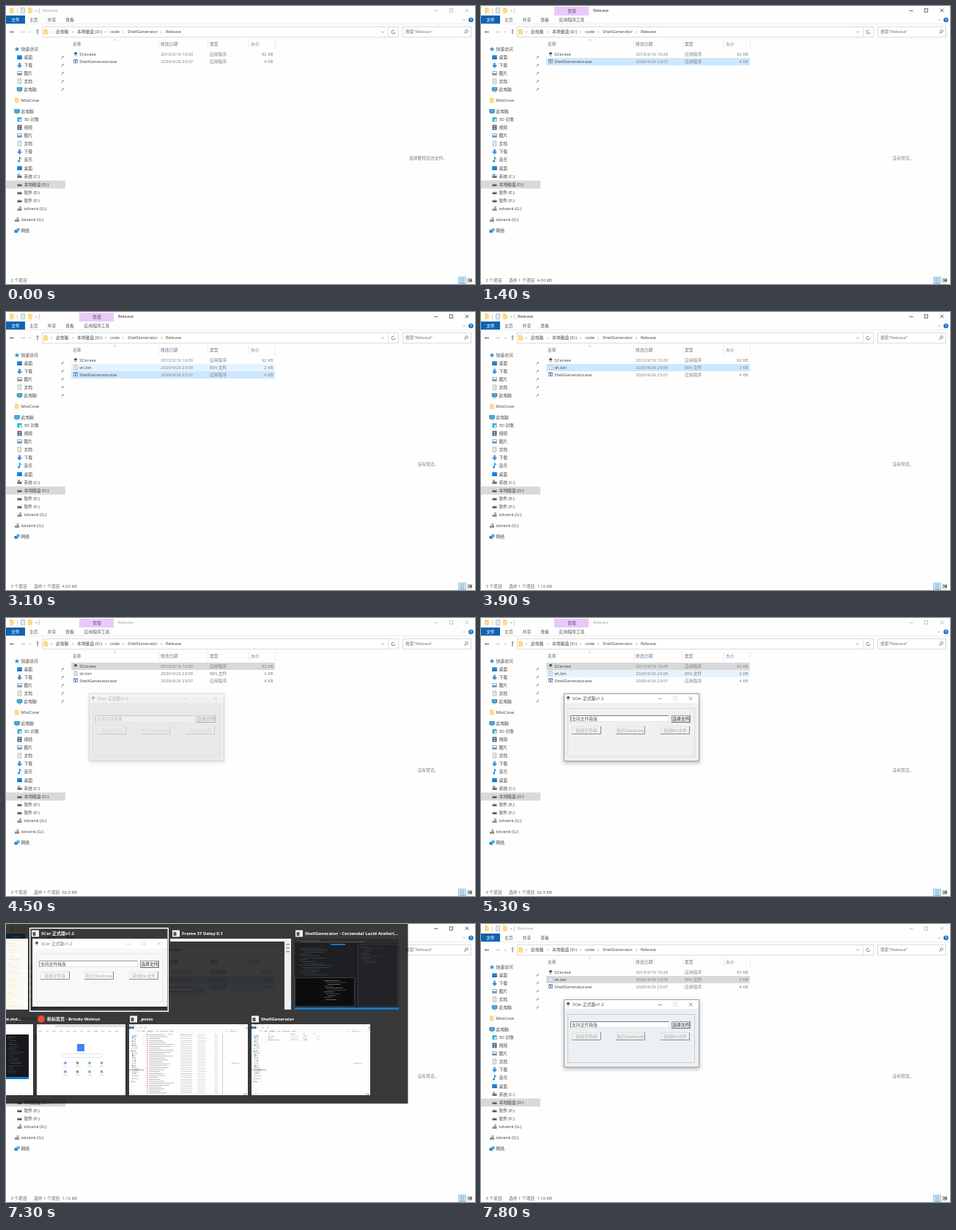
Write an HTML page with a canvas that moves like this. It is 640 px wide and 380 px high and loops after 8 s.

```html
<!DOCTYPE html>
<html lang="zh-CN">
<head>
<meta charset="utf-8">
<title>Release</title>
<style>
html, body { margin: 0; width: 100%; height: 100%; overflow: hidden; background: #fff }
canvas { display: block }
</style>
</head>
<body>
<canvas id="stage" width="640" height="380"></canvas>
<script>
const c = document.getElementById('stage').getContext('2d');
const LOOP = 8000;
const UI = '"Noto Sans", "Noto Sans CJK SC", "Noto Sans CJK", sans-serif';
const CLASSIC = '"Liberation Sans", "Noto Sans CJK SC", "Noto Sans CJK", sans-serif';

// value of the last [time, value] step that has begun
const step = (t, ...list) => list.filter(([at]) => at <= t).pop()[1];
const rnd = n => { const v = Math.sin(n * 12.9898) * 43758.5453; return v - Math.floor(v); };

function box(x, y, w, h, fill, edge) {
  if (fill) { c.fillStyle = fill; c.fillRect(x, y, w, h); }
  if (edge) { c.strokeStyle = edge; c.lineWidth = 1; c.strokeRect(x + .5, y + .5, w - 1, h - 1); }
}
function line(color, width, ...p) {
  c.strokeStyle = color;
  c.lineWidth = width;
  c.beginPath();
  for (let i = 0; i < p.length; i += 2) c.lineTo(p[i], p[i + 1]);
  c.stroke();
}
function dot(x, y, r, fill) {
  c.fillStyle = fill;
  c.beginPath();
  c.arc(x, y, r, 0, 7);
  c.fill();
}
// y is the middle of the line
function text(s, x, y, color = '#484848', align = 'left', font = '5.8px ' + UI) {
  c.font = font;
  c.fillStyle = color;
  c.textAlign = align;
  c.fillText(s, x, y + 2.1);
}
function chevron(x, y, dx, dy, color = '#777') {
  line(color, .8, x - dx - dy * 2, y - dy - dx * 2, x + dx, y + dy, x - dx + dy * 2, y - dy + dx * 2);
}
function caption(xs, y, color, midColor = color) {
  const [a, b, d] = xs;
  line(color, .8, a - 2.5, y + .5, a + 2.5, y + .5);
  c.strokeStyle = midColor;
  c.strokeRect(b - 2.2, y - 2.2, 4.4, 4.4);
  line(color, .8, d - 2.3, y - 2.3, d + 2.3, y + 2.3);
  line(color, .8, d + 2.3, y - 2.3, d - 2.3, y + 2.3);
}

const icons = {
  folder() { box(-3, -3.5, 4, 7, '#f2bf4b'); box(-3, -2.5, 6, 6, '#ffdc82'); },
  star() {
    c.fillStyle = '#2f8fd8';
    c.beginPath();
    for (let i = 0; i < 10; i++) {
      const r = i % 2 ? 1.6 : 3.8, a = i * Math.PI / 5;
      c.lineTo(r * Math.sin(a), -r * Math.cos(a));
    }
    c.fill();
  },
  desk() { box(-3.5, -2.8, 7, 5.6, '#1b86dc'); box(-3.5, 1.5, 7, 1.3, '#0d5ea8'); },
  down() { line('#2683d6', 2.4, 0, -3.5, 0, 1); line('#2683d6', 1.6, -2.8, 0, 0, 2.8, 2.8, 0); },
  pic() { box(-3.5, -3, 7, 6, '#f4f8fb', '#9aa5ad'); box(-2.5, 0, 5, 2, '#3f8fc9'); },
  doc() {
    box(-2.8, -3.8, 5.6, 7.6, '#fff', '#b3b3b3');
    box(-1.3, -1.6, 2.8, .7, '#9bb7cf'); box(-1.3, .6, 2.8, .7, '#9bb7cf');
  },
  pc() { box(-3.8, -3, 7.6, 5, '#49b2ee', '#3a83b5'); box(-2.5, 2.6, 5, 1, '#5b8db0'); },
  cube() { box(-3.2, -3, 6.4, 6.2, '#1fb3d6'); box(-.5, -.5, 3, 3, '#d5f4fa'); },
  film() { box(-3, -3.6, 6, 7.2, '#4b4b52'); box(-1.6, -2.5, 3.2, 2, '#b9c7d6'); box(-1.6, .7, 3.2, 2, '#b9c7d6'); },
  note() { line('#1c8be0', 1.2, 0, 2, 0, -3.5, 2.3, -1); dot(-1, 2.2, 1.6, '#1c8be0'); },
  disk() { box(-3.2, -1.4, 6.4, 1.6, '#b5b8ba'); box(-3.2, 0, 6.4, 2.4, '#53585c'); },
  sys() { icons.disk(); box(-2.5, -3.2, 3, 2, '#39a5e3'); },
  usb() { box(-3.2, 0, 6.4, 3, '#8b8f92'); box(-.5, -3.4, 3, 3.4, '#a9adb0'); },
  net() { box(-3.8, -1, 5, 4, '#2c86c8'); box(-.5, -3.2, 4.3, 4, '#49aee8'); },
  person() { dot(0, -1.3, 2, '#34404b'); box(-2, .6, 4, 2.5, '#c9d3d6'); box(-2.6, -1.2, 5.2, .9, '#4c7d76'); },
  app() { box(-3.2, -3, 6.4, 6, '#fff', '#7d93ad'); box(-3.2, -3, 6.4, 1.6, '#3e7ec4'); box(-1, -.3, 2, 2, '#2a5fa3'); }
};
function icon(kind, x, y, k = 1) {
  c.save();
  c.translate(x, y);
  c.scale(k, k);
  icons[kind]();
  c.restore();
}

const FILES = {
  scer: { name: 'SCer.exe', date: '2013/2/16 10:29', type: '应用程序', size: '92 KB', full: '92.0 KB', icon: 'person' },
  bin: { name: 'sh.bin', date: '2020/4/26 23:09', type: 'BIN 文件', size: '2 KB', full: '1.10 KB', icon: 'doc' },
  gen: { name: 'ShellGenerator.exe', date: '2020/4/26 23:07', type: '应用程序', size: '4 KB', full: '4.00 KB', icon: 'app' }
};
// y, icon, label; "-" marks a top-level entry
const TREE = [
  [59, 'star', '-快速访问'], [70, 'desk', '桌面'], [81, 'down', '下载'], [92, 'pic', '图片'], [103, 'doc', '文档'],
  [114, 'pc', '此电脑'], [129, 'folder', '-MistCove'], [144, 'pc', '-此电脑'], [155, 'cube', '3D 对象'],
  [166, 'film', '视频'], [177, 'pic', '图片'], [188, 'doc', '文档'], [199, 'down', '下载'], [210, 'note', '音乐'],
  [221.5, 'desk', '桌面'], [232.5, 'sys', '系统 (C:)'], [244, 'disk', '本地磁盘 (D:)'], [255, 'disk', '软件 (E:)'],
  [266, 'disk', '软件 (F:)'], [277, 'usb', 'tolvenk (G:)'], [292, 'usb', '-tolvenk (G:)'], [307, 'net', '-网络']
];

function titleBar(s) {
  const tool = s.sel && s.sel !== 'bin';
  icon('folder', 8, 6);
  icon('doc', 23, 6);
  icon('folder', 33, 6);
  line('#aaa', .6, 15.5, 3, 15.5, 10);
  line('#aaa', .6, 45.5, 3, 45.5, 10);
  chevron(41.5, 6.5, 0, .6);
  if (tool) {
    box(100, 1, 47, 12, '#e9c9fb');
    text('管理', 124, 7, '#6a5478', 'center');
    text('应用程序工具', 124, 19, '#555', 'center');
  }
  text('Release', tool ? 153 : 50, 6.3, s.active ? '#333' : '#a5a5a5');
  caption([587, 607.5, 629], 6, s.active ? '#444' : '#b5b5b5');
  box(0, 13, 26, 11, '#0f63b3');
  text('文件', 13, 19, '#fff', 'center');
  ['主页', '共享', '查看'].forEach((label, i) => text(label, 32 + 24.6 * i, 19, '#555'));
  chevron(625, 19, 0, .7, '#999');
  dot(634.5, 19, 3.3, '#1673c7');
  text('?', 634.5, 19, '#fff', 'center', 'bold 5px ' + UI);
  box(0, 24, 640, 1, '#ececec');
}

function addressBar() {
  line('#555', .9, 5.5, 35.5, 11, 35.5); chevron(6, 35.5, -.6, 0, '#555');
  line('#c4c4c4', .9, 20, 35.5, 25.5, 35.5); chevron(25, 35.5, .6, 0, '#c4c4c4');
  chevron(33, 35.5, 0, .6, '#999');
  line('#555', .9, 43, 38.5, 43, 32.5); chevron(43, 33, 0, -.6, '#555');
  box(49, 28, 487, 15, '#fff', '#dcdcdc');
  box(541, 28, 94, 15, '#fff', '#dcdcdc');
  icon('folder', 54.5, 35.5);
  [62, 91, 136, 160, 212].forEach(x => chevron(x, 35.5, .5, 0));
  [[68, '此电脑'], [97, '本地磁盘 (D:)'], [142, 'code'], [166, 'ShellGenerator'], [218, 'Release']]
    .forEach(([x, label]) => text(label, x, 35.3));
  chevron(514, 35.5, 0, .8);
  box(521, 29, 1, 13, '#e2e2e2');
  c.strokeStyle = '#666';
  c.lineWidth = .8;
  c.beginPath(); c.arc(528.5, 35.5, 2.3, 0, 5.2); c.stroke();
  text('搜索"Release"', 545, 35.3, '#777');
  c.beginPath(); c.arc(628.5, 34.5, 1.8, 0, 7); c.stroke();
  line('#666', .8, 627, 36, 625.3, 38);
}

function tree() {
  box(0, 238.5, 81, 11, '#d9d9d9');
  TREE.forEach(([y, kind, label], i) => {
    const top = label[0] === '-';
    icon(kind, top ? 15 : 18.5, y, .95);
    text(label.replace('-', ''), top ? 20.5 : 24.5, y);
    if (i > 0 && i < 6) {
      line('#888', 1.3, 76.5, y + .5, 78.7, y - 1.6);
      line('#888', .7, 75, y + 2, 77, y);
    }
  });
}

function fileList(s) {
  chevron(148.5, 46.5, 0, -.6, '#999');
  [[91, '名称'], [211, '修改日期'], [278, '类型'], [334, '大小']].forEach(([x, label]) => text(label, x, 52, '#66748a'));
  [208, 275, 331, 367].forEach(x => box(x, 46, 1, 13, '#ebebeb'));
  s.files.forEach((id, i) => {
    const f = FILES[id], y = 66 + 9.7 * i;
    const back = id === s.sel ? (s.active ? '#cce8ff' : '#d9d9d9') : id === s.hover ? '#e5f3ff' : null;
    if (back) box(89, 61 + 10 * i, 278, 10, back);
    icon(f.icon, 95, y, .9);
    text(f.name, 100.3, y);
    text(f.date, 211.3, y, '#808080');
    text(f.type, 278, y, '#808080');
    text(f.size, 364.5, y, '#808080', 'right');
  });
}

function explorer(s) {
  box(0, 0, 640, 380, '#fefefe');
  titleBar(s);
  addressBar();
  tree();
  fileList(s);
  text(s.sel ? '没有预览。' : '选择要预览的文件。', 576, 208, '#808080', 'center');
  text(s.files.length + ' 个项目', 6.5, 375.3, '#606060');
  if (s.sel) {
    text('选中 1 个项目', 38, 375.3, '#606060');
    text(FILES[s.sel].full, 76.5, 375.3, '#606060');
  }
  box(617, 370, 11, 10, '#cfe9f8', '#8ecdf0');
  for (let y = 372; y < 379; y += 2) box(619.5, y, 6, .8, '#8fa6b4');
  box(630, 372.5, 6, 5, '#fff', '#777');
  box(632, 374, 3, 2, '#666');
}

const LOOKS = {
  plain: { back: '#f0f0f0', edge: '#a0a0a0', group: '#c4c4c4', ink: '#444', mark: '#888', field: '#777' },
  dragged: { back: '#ecf0f2', edge: '#a0a0a0', group: '#a5b2b8', ink: '#444', mark: '#777', field: '#777' },
  preview: { back: '#f8f8f8', edge: '#ececec', group: '#d4d4d4', ink: '#777', mark: '#c4c4c4', field: '#999' }
};
function dialogButton(label, x, y, w, h, look, on) {
  box(x, y, w, h, look.back, on ? '#999' : '#e4e4e4');
  line(on ? '#666' : '#8c8c8c', 1, x, y + h - .5, x + w - .5, y + h - .5, x + w - .5, y);
  text(label, x + w / 2, y + h / 2, on ? '#333' : '#adadad', 'center', '5.8px ' + CLASSIC);
}
function dialog(alpha, look) {
  c.save();
  c.globalAlpha = alpha;
  c.shadowColor = 'rgba(0,0,0,.3)';
  c.shadowBlur = 6;
  c.shadowOffsetY = 1.5;
  box(113, 103, 185, 93, look.back);
  c.shadowColor = 'transparent';
  box(114, 104, 183, 12, '#fff');
  box(113, 103, 185, 93, null, look.edge);
  icon('person', 119, 110, .9);
  text('SCer 正式版v1.2', 125, 109.7, look.ink);
  caption([244, 265, 286], 110, look.mark, '#d4d4d4');
  c.setLineDash([1, 1]);
  box(118, 123, 174, 67, null, look.group);
  c.setLineDash([]);
  box(122, 133, 135, 9, '#fff', '#e4e4e4');
  line(look.field, 1, 122.5, 142, 122.5, 133.5, 256, 133.5);
  text('支持文件拖曳', 124, 138, '#555', 'left', '5.8px ' + CLASSIC);
  dialogButton('选择文件', 260, 133, 25.5, 10, look, true);
  dialogButton('转成字符串', 124, 148, 40, 11, look);
  dialogButton('执行Shellcode', 184, 148, 40, 11, look);
  dialogButton('转成Bin文件', 245, 148, 40, 11, look);
  c.restore();
}

// pale trace left behind when the dialog goes to the back
function trace() {
  c.strokeStyle = '#f7f7f7';
  c.lineWidth = 4;
  c.beginPath(); c.roundRect(105, 95, 199, 108, 6); c.stroke();
  box(114, 104, 183, 11, '#fafafa');
  box(124, 134, 132, 8, '#f7f7f7');
}

function dragTip() {
  box(183, 87, 88, 10, '#fff', '#bbb');
  text('用 ShellGenerator.exe 打开', 268.5, 92, '#3b4a8c', 'right');
}

// rows of tiny unreadable writing
function scribble(x, y, w, rows, gap, colors, seed) {
  for (let i = 0; i < rows; i++) {
    const r = rnd(seed + i);
    box(x + (i % 3) * w * .06, y + i * gap, w * (.2 + .6 * r), .6, colors[i % colors.length]);
  }
}
function clipped(x, y, w, h, paint) {
  c.save();
  c.beginPath(); c.rect(x, y, w, h); c.clip();
  paint();
  c.restore();
}
function miniExplorer(x, files) {
  clipped(x, 137, 162, 97, () => {
    c.translate(x, 137);
    c.scale(162 / 640, 97 / 380);
    explorer({ files, active: false });
  });
}
function heading(label, x, y, kind) {
  if (kind === 'round') dot(x - 8, y, 5, '#ea4a3a');
  else if (kind) { box(x - 13, y - 4.5, 10, 9, '#f2f3f3'); box(x - 11.5, y - 2, 4, 5, '#45615f'); }
  text(label, x, y, '#fff', 'left', 'bold 6px ' + UI);
}

function codeThumb() {
  box(394, 20, 142, 97, '#1e1f22');
  box(394, 20, 142, 6, '#2d2d31');
  scribble(396, 22, 110, 2, 2, ['#66666c'], 12);
  box(443, 27, 20, 2, '#0d78cc');
  scribble(400, 33, 60, 15, 2.6, ['#3f5a3d', '#4c4f55', '#344f68'], 21);
  box(394, 73, 82, 40, '#0d0d0f', '#3c3c40');
  scribble(434, 77, 38, 11, 2.6, ['#999', '#666'], 40);
  box(480, 27, 55, 86, '#222327', '#38383d');
  scribble(484, 31, 40, 9, 2.6, ['#50545a', '#3c3f45'], 61);
  box(394, 114, 142, 3, '#0d78cc');
}

function notesThumb() {
  box(0, 137, 37, 97, '#fdfdfd');
  box(0, 151, 31, 61, '#17181c');
  scribble(2, 154, 25, 20, 2.6, ['#555', '#3c4a60'], 81);
  box(0, 209, 31, 3, '#0d78cc');
}

function browserThumb() {
  box(42, 137, 121, 97, '#fff');
  box(42, 137, 121, 4, '#dee1e6');
  box(45, 138, 22, 3, '#fff');
  for (let i = 0; i < 12; i++) box(44 + i * 9.5, 146, 5, 1, ['#e4c896', '#c0cccc', '#dfb0b0'][i % 3]);
  box(97, 164, 10, 10, '#4285f4');
  c.strokeStyle = '#ddd';
  c.lineWidth = .8;
  c.beginPath(); c.roundRect(75, 177.5, 56, 5, 2.5); c.stroke();
  for (let i = 0; i < 8; i++) {
    const x = 81 + (i % 4) * 16.5, y = 190 + (i >> 2) * 12;
    dot(x, y, 3, '#e9ecf0');
    dot(x, y, 1.4, ['#5b8bd0', '#777', '#4a9', '#c77'][i % 4]);
    box(x - 3, y + 4.5, 6, .6, '#bbb');
  }
}

function postsThumb() {
  miniExplorer(168, []);
  for (let i = 0; i < 31; i++) {
    const y = 151 + i * 2.65;
    box(192, y, 1.3, 1.3, '#e0786f');
    box(195, y, 12 + 22 * rnd(i + 5), .8, '#aaa');
    box(238, y, 16, .6, '#b5b5b5');
    box(261, y, 11, .6, '#c4c4c4');
    box(284, y, 5, .6, '#c4c4c4');
  }
  box(295, 150, 1, 82, '#d0d0d0');
}

function switcher() {
  box(0, 0, 548.5, 245.5, 'rgba(20,20,20,.84)');

  box(0, 20, 30, 97, '#fbfaf4');
  scribble(2, 26, 20, 28, 3.2, ['#f2dfac', '#ddd', '#f5ecd2'], 3);

  clipped(36, 20, 184, 97, () => {
    c.translate(-77, -83);
    dialog(1, LOOKS.preview);
  });
  heading('SCer 正式版v1.2', 48, 13, 'app');
  c.strokeStyle = '#fff';
  c.lineWidth = 1.5;
  c.strokeRect(32.7, 5.7, 188.6, 113.6);

  heading('Frame 37 Delay 0.1', 240, 13, 'app');
  box(224, 20, 165, 4, '#f3f0f6');
  box(380, 24, 9, 93, '#eeeff0');
  for (let y = 27; y < 42; y += 5) box(382, y, 5, 1.5, '#999');

  heading('ShellGenerator - Corvendal Lucid Atelier(...', 408, 13, 'app');
  codeThumb();

  text('le.md...', -1, 130, '#fff', 'left', 'bold 6px ' + UI);
  notesThumb();

  heading('新标签页 - Brindo Walnut', 56, 130, 'round');
  browserThumb();

  heading('_posts', 182, 130, 'app');
  postsThumb();

  heading('ShellGenerator', 348, 130, 'app');
  miniExplorer(335, ['scer', 'bin', 'gen']);
}

function draw(t) {
  explorer({
    files: t < 2400 ? ['scer', 'gen'] : ['scer', 'bin', 'gen'],
    sel: step(t, [0, null], [1300, 'gen'], [3300, 'bin'], [4200, 'scer'], [5600, 'bin']),
    hover: step(t, [0, null], [1000, 'gen'], [2400, 'scer'], [2800, 'bin'], [4000, 'scer'],
      [4500, null], [5100, 'gen'], [5200, 'bin'], [7000, 'gen'], [7700, null]),
    active: step(t, [0, false], [1300, true], [4500, false], [5600, true], [7400, false])
  });
  if (t >= 5700 && t < 7000) trace();
  if (t >= 7000 && t < 7700) dragTip();
  const shown = step(t, [0, 0], [4500, .35], [4600, .8], [4700, 1], [5600, .5], [5700, 0], [7400, 1]);
  if (shown) dialog(shown, t < 7400 ? LOOKS.plain : LOOKS.dragged);
  if (t >= 7100 && t < 7400) switcher();
}

const start = performance.now();
function tick() {
  draw((performance.now() - start) % LOOP);
  requestAnimationFrame(tick);
}
tick();
</script>
</body>
</html>
```
